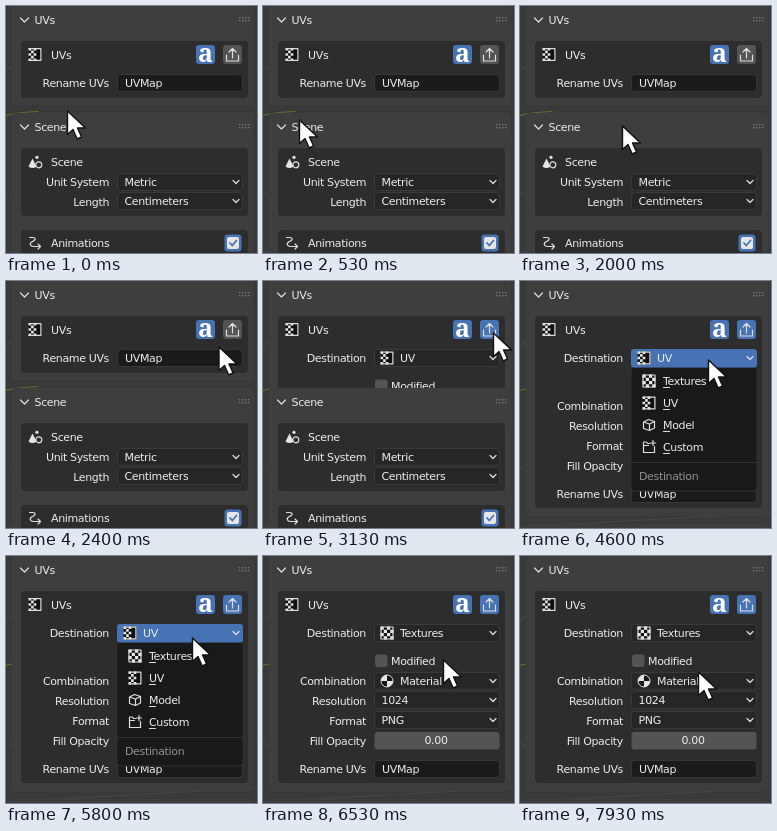
Recreate the animation shown at these times as an HTML page. Size 251x247 px, loop 8000 ms.

```html
<!DOCTYPE html>
<html lang="en">
<head>
<meta charset="utf-8">
<title>UV export panel</title>
<style>
  html, body { margin: 0; width: 251px; height: 247px; overflow: hidden; background: #393939; }
  svg { display: block; }
  text { font: 11px "DejaVu Sans", sans-serif; letter-spacing: -.35px; fill: #ececec; }
  .end { text-anchor: end; }
  .mid { text-anchor: middle; }
  .dim { fill: #929292; }
  .bold { font: bold 25px "Noto Serif", serif; fill: #fff; letter-spacing: 0; }
  .panel { fill: #3e3e3e; }
  .box { fill: #2d2d2d; }
  .text { fill: #1b1b1b; stroke: #373737; }
  .drop { fill: #262626; stroke: #3a3a3a; }
  .drop.hover { fill: #404040; }
  .num, .off { fill: #545454; }
  .hover.off { fill: #686868; }
  .on { fill: #4772b3; }
  .line { fill: none; stroke: #dedede; stroke-width: 1.2; stroke-linecap: round; stroke-linejoin: round; }
  .solid { fill: #e6e6e6; }
</style>
</head>
<body>
<svg id="stage" width="251" height="247" viewBox="0 0 251 247"></svg>
<script>
const rect = (cls, x, y, w, h, r = 3, more = '') =>
  `<rect class="${cls}" x="${x}" y="${y}" width="${w}" height="${h}" rx="${r}" ${more}/>`;
const text = (s, x, y, cls = '') => `<text class="${cls}" x="${x}" y="${y + 4}">${s}</text>`;
const line = (d, more = '') => `<path class="line" d="${d}" ${more}/>`;
const group = (id, body) => `<g id="${id}">${body}</g>`;
const at = (x, y, body) => `<g transform="translate(${x} ${y})">${body}</g>`;
const chevron = (x, y, w = 3) => line(`M${x - w} ${y - w / 2}l${w} ${w}l${w} ${-w}`);

function checker(cols, rows, size) {
  let d = '';
  for (let i = 0; i < cols * rows; i++) {
    const c = i % cols, r = Math.floor(i / cols);
    if ((c + r) % 2 === 0) d += `M${c * size} ${r * size}h${size}v${size}h${-size}z`;
  }
  return `<path class="solid" d="${d}"/>`;
}

// Icons fill a 13 px square
const icons = {
  uv: rect('', 0, 0, 13, 13, 0, 'fill="#111"') + checker(3, 5, 2.6) +
    line('M.6 .6H12.4V12.4H.6', 'stroke-width="1.3"'),
  textures: rect('', 0, 0, 13, 13, 1, 'fill="#111"') + checker(4, 4, 3.25) +
    line('M.5 .5H12.5V12.5H.5z', 'stroke-width=".7"'),
  model: line('M1 3.5L6 1L12 3V9.5L7 12L1 10zM1 3.5L7 5.5L12 3M7 5.5V12'),
  custom: line('M7 3H5L4 1.5H1V12H12V6M1 5H6M10.5 0V5M8 2.5H13'),
  material: '<circle cx="6.5" cy="6.5" r="6" fill="#161616" stroke="#ddd"/>' +
    '<path class="solid" d="M6.5 6.5V.5A6 6 0 0 0 .5 6.5zM6.5 6.5H12.5A6 6 0 0 1 6.5 12.5z"/>',
  scene: '<path class="solid" d="M4 3L8 11Q4 14 0 11z"/><circle class="solid" cx="8.5" cy="1.8" r="1.6"/>' +
    '<circle class="line" cx="10.3" cy="9.3" r="3"/>',
  path: line('M1 2H4C8 2 7 5 4 6C0 8 2 11 5 11H12M9.5 8.5L12 11L9.5 13.5')
};
const icon = (name, x, y) => at(x, y - 6.5, icons[name]);

const label = (s, y) => text(s, 103, y, 'end');
const drop = (y, s, x = 118.5, id = '') =>
  rect('drop', 111.5, y - 8.5, 125, 17, 3, id && `id="${id}"`) + text(s, x, y) + chevron(230, y);
const field = (y, s) => rect('text', 111.5, y - 8.5, 125, 17) + text(s, 119, y);
const rename = y => label('Rename UVs', y) + field(y, 'UVMap');

function header(s, y) {
  let dots = '';
  for (let i = 0; i < 8; i++) {
    dots += `<rect x="${233 + (i % 4) * 3}" y="${y - 3 + Math.floor(i / 4) * 3}" width="1.4" height="1.4" fill="#777"/>`;
  }
  return chevron(18.5, y, 4) + text(s, 28.5, y) + dots;
}

const backdrop = line('M-2 66L9 58M-2 185L9 192M0 246L251 232', 'style="stroke:#454545"') +
  line('M0 109.5Q10 106.5 32 105.5', 'style="stroke:#54752a"');

const uvPanel = rect('panel', 6, -5, 242, 240, 4) + header('UVs', 14) +
  rect('box', 15, 35, 227, 57, 4, 'id="smallBox"') +
  rect('box', 15, 35, 227, 192, 4, 'id="bigBox"') +
  icon('uv', 22.5, 48.5) + text('UVs', 45, 49) +
  rect('on', 190, 39, 19, 19) + text('a', 199.5, 52, 'bold mid') +
  rect('off', 217, 39, 19, 19, 3, 'id="upload"') +
  line('M226.5 52V42.5M223 46L226.5 42.5L230 46M220.5 49V55H232.5V49') +
  group('short', rename(77)) +
  group('long',
    label('Destination', 77) + drop(77, '', 0, 'target') +
    group('asUv', icon('uv', 117.5, 77) + text('UV', 137, 77)) +
    group('asTextures', icon('textures', 117.5, 77) + text('Textures', 137, 77)) +
    rect('off', 112, 98.5, 12.5, 12.5) + text('Modified', 128, 105) +
    label('Combination', 125) + drop(125, 'Material', 137) + icon('material', 117.5, 125) +
    label('Resolution', 145) + drop(144, '1024') +
    label('Format', 165) + drop(164, 'PNG') +
    label('Fill Opacity', 185) + rect('num', 111.5, 176, 125, 17.5) + text('0.00', 173, 184, 'mid') +
    rename(213));

const scenePanel = rect('panel', 6, 107, 242, 160, 4) + header('Scene', 121) +
  rect('box', 15, 142, 227, 68, 4) + icon('scene', 22.5, 156) + text('Scene', 45, 156) +
  label('Unit System', 176) + drop(176, 'Metric') +
  label('Length', 196) + drop(195, 'Centimeters') +
  rect('box', 15, 224, 227, 40, 4) + icon('path', 22.5, 236) + text('Animations', 45, 237) +
  rect('on', 218.5, 228.5, 17, 17) + rect('solid', 221, 231, 12, 12, 2) +
  line('M224 237L226.3 239.5L230.5 234.5', 'style="stroke:#4772b3;stroke-width:1.8"');

const choice = (name, s, y) => icon(name, 122.5, y) + text(s, 143, y) +
  line(`M143.5 ${y + 6.5}h6`, 'stroke-width="1"');
const menu = rect('', 111, 86, 126, 124, 3, 'fill="#191919" stroke="#333"') +
  rect('on', 111, 68, 126, 18.5) + icon('uv', 117.5, 77) + text('UV', 137, 77) + chevron(230, 77) +
  rect('on', 114, 90, 119, 20, 3, 'id="pick"') +
  choice('textures', 'Textures', 100) + choice('uv', 'UV', 122) +
  choice('model', 'Model', 144) + choice('custom', 'Custom', 166) +
  line('M112 181.5H236', 'style="stroke:#343434"') + text('Destination', 119, 195, 'dim');

const pointer = '<path d="M.5 2V25.5L6 20.5L10.2 30L14.6 28L10.5 19H18.5z" ' +
  'fill="#fff" stroke="#111" stroke-width="1.4" stroke-linejoin="round"/>';

const $ = id => document.getElementById(id);
$('stage').innerHTML =
  '<clipPath id="clip"><rect id="clipBox" width="251" height="99"/></clipPath>' + backdrop +
  `<g clip-path="url(#clip)">${uvPanel}</g>` + group('scene', scenePanel) +
  group('menu', menu) + group('cursor', pointer);

const RATE = 15, LOOP = 8000;
const OPEN = 47, MENU = 69, CHOSEN = 98, GROWTH = 136;

// Pointer stops: step, x, y
const stops = [
  [0, 61, 103], [8, 36, 112], [25, 36, 112], [30, 102, 118], [38, 231, 55], [40, 230, 50],
  [61, 230, 50], [62, 228, 55], [68, 188, 77], [86, 188, 77], [87, 186, 80], [95, 180, 102],
  [115, 180, 102], [119, 178, 114]
];

function pointerAt(step) {
  const i = Math.max(1, stops.findIndex(s => s[0] >= step));
  const [a, x0, y0] = stops[i - 1], [b, x1, y1] = stops[i];
  let k = (step - a) / (b - a);
  if (b === 8 || b === 95) k = k * k * (3 - 2 * k);
  if (b === 30) k = k ** 1.3;
  if (b === 38) k = 1 - (1 - k) ** 1.4;
  return [x0 + (x1 - x0) * k, y0 + (y1 - y0) * k];
}

const show = (id, on) => { $(id).style.display = on ? '' : 'none'; };

function draw() {
  // The small offset absorbs rounding of step times to 10 ms
  const step = Math.floor((performance.now() % LOOP) * RATE / 1000 + 0.06) % 120;
  const [x, y] = pointerAt(step);
  const open = step >= OPEN;
  const shift = open ? GROWTH * Math.min(1, (step - OPEN) / 2) : 0;
  const listed = step >= MENU && step < CHOSEN;

  $('cursor').setAttribute('transform', `translate(${x.toFixed(1)} ${y.toFixed(1)})`);
  $('scene').setAttribute('transform', `translate(0 ${shift})`);
  $('clipBox').setAttribute('height', open ? Math.min(235, 108 + shift) : 99);
  show('short', !open);
  show('smallBox', !open);
  show('long', open);
  show('bigBox', open);
  show('asUv', step < CHOSEN);
  show('asTextures', step >= CHOSEN);
  show('menu', listed);
  show('pick', y > 90);
  $('upload').setAttribute('class', open ? 'on' : step >= 38 ? 'off hover' : 'off');
  $('target').setAttribute('class', step >= 66 && step < MENU ? 'drop hover' : 'drop');
  requestAnimationFrame(draw);
}
draw();
</script>
</body>
</html>
```
